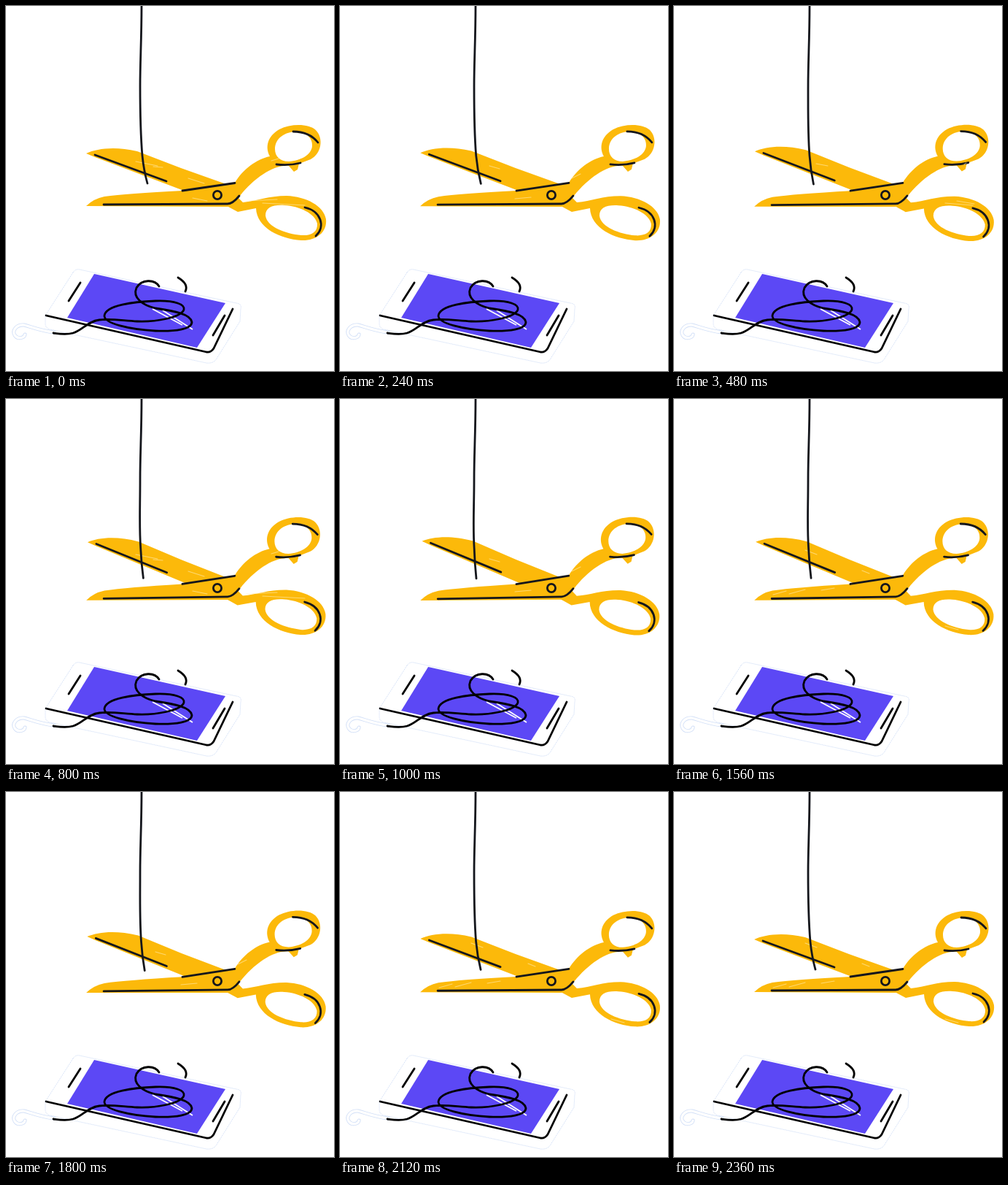
An HTML page that plays this animation: 450 by 500 pixels, repeating every 2.4 s.

```html
<!DOCTYPE html>
<html lang="en">
<head>
<meta charset="utf-8">
<title>Cutting the cord</title>
<style>
  html, body { margin: 0; width: 100%; height: 100%; overflow: hidden; background: #fff; }
  svg { display: block; width: 450px; height: 500px; }
  .line { fill: none; stroke: #14161c; stroke-width: 2.8; stroke-linecap: round; stroke-linejoin: round; }
  .gold { fill: #fcb90a; fill-rule: evenodd; }
  .edge { stroke: #c9d9f6; stroke-width: 1; stroke-dasharray: 1 1; }
  .phone .line { stroke: #000; }
  .scratch { fill: none; stroke: #fff0c4; stroke-width: 1.1; stroke-linecap: round; opacity: .55; }
</style>
</head>
<body>
<svg viewBox="0 0 450 500">
  <g class="phone">
    <path class="edge" fill="#fff" d="M92 365Q95 360 101 361L316 407Q324 408 322 415L321 432L289 483Q285 490 275 489L60 443Q54 441 54 435L54 424Z"/>
    <path fill="#5c48f5" d="M121 367L301 407L262 468L84 427Z"/>
    <path class="line" d="M55 424L275 474Q281 475 285 469L311 415M102 379L86 404M300 424L284 451"/>
    <path fill="none" stroke="#fff" stroke-width="1.8" d="M201 415L242 437M215 417L256 443"/>
    <path id="tail" fill="none" stroke="#d3e0f7" stroke-width="5" stroke-linecap="round" d="M66 447C48 445 36 440 25 437C14 436 8 445 12 451C16 457 25 455 26 450"/>
    <path fill="none" stroke="#fff" stroke-width="3.2" stroke-linecap="round" d="M66 447C48 445 36 440 25 437C14 436 8 445 12 451C16 457 25 455 26 450"/>
    <path class="line" d="M210 384C204 374 186 374 179 386C173 400 188 410 205 414C232 418 253 422 255 433C255 443 232 446 205 445C170 443 134 435 135 424C137 410 175 405 205 404C232 403 246 409 244 416C240 427 205 433 180 432C160 431 143 428 128 430C112 432 105 444 92 448C82 451 72 449 65 448M236 372Q251 381 246 391"/>
  </g>

  <g id="rear">
    <path class="gold" d="M110 202C125 195 150 192 180 199L240 222L302 244L300 268L244 253L122 207Z"/>
    <path class="line" d="M122 204L220 240"/>
  </g>
  <g id="grip">
    <path class="gold" d="M292 250L318 262L325 269C345 267 360 260 385 260C412 261 436 274 439 292C441 311 424 322 405 321C376 319 344 304 343 277L318 282L303 274Z
      M356 287C356 276 366 272 382 273C402 274 424 284 427 298C428 310 418 315 405 314C384 312 358 303 356 287Z"/>
    <path class="line" d="M410 276C432 281 439 302 425 315"/>
  </g>
  <g id="front">
    <path class="gold" d="M110 274Q120 264 135 261Q165 257 242 253L314 242C325 224 343 210 362 206C355 193 359 178 375 169C391 161 415 161 425 170C436 181 433 202 418 210L402 216L400 224L395 227L388 219C368 217 341 235 321 260Q313 275 303 275Z
      M369 196C369 181 383 172 399 172C413 173 421 182 420 192C419 204 404 212 388 213C376 213 369 206 369 196Z"/>
    <path class="line" d="M134 272L304 271Q311 271 320 260M242 253L314 242.500M394 172Q416 172 428 187M371 217Q388 219 404 215"/>
    <circle class="line" cx="290" cy="259" r="5.600"/>
  </g>
  <path id="scratch" class="scratch"/>
  <path id="cord" class="line" stroke-width="3.3"/>
</svg>
<script>
  const LOOP = 2400, STEP = 40, TEXTURE_LOOP = 800;
  const get = id => document.getElementById(id);
  const rear = get('rear'), grip = get('grip'), front = get('front');
  const cord = get('cord'), scratch = get('scratch');

  // [start within the texture loop, strokes]
  const textures = [
    [0, 'M178 213l30 6M202 220l13 1M256 263l20 4M330 267l42 -2M352 270l58 3M364 212l10 -3M250 236l22 7'],
    [160, 'M318 236l12 -6M240 264l22 -2M205 219l14 4'],
    [360, 'M372 270l38 3M388 267l24 4M195 216l16 3M398 217l3 -2'],
    [520, 'M136 268l18 -5M158 267l22 -6M180 207l16 6M258 235l10 4M372 311l18 5M202 262l18 -3']
  ];

  const turn = (el, deg) => el.setAttribute('transform', `rotate(${deg} 290 259)`);
  const mix = (a, b, k) => (a + (b - a) * k).toFixed(2);

  function draw(now) {
    const t = Math.floor((now % LOOP) / STEP) * STEP;
    const k = (1 - Math.cos(2 * Math.PI * t / LOOP)) / 2;

    turn(rear, 2.5 * k);
    turn(grip, 1.3 * k);
    turn(front, -0.7 * k);

    cord.setAttribute('d', `M186 -3C186 45 184 75 184 110C184 150 ${mix(184.5, 182, k)} 175 ` +
      `${mix(187, 184, k)} 205Q${mix(189, 184.5, k)} 225 ${mix(194, 186.5, k)} ${mix(243, 246, k)}`);

    const phase = t % TEXTURE_LOOP;
    scratch.setAttribute('d', textures.filter(([start]) => start <= phase).pop()[1]);
  }

  const begin = performance.now();
  function tick() {
    draw(performance.now() - begin);
    requestAnimationFrame(tick);
  }
  tick();
</script>
</body>
</html>
```
